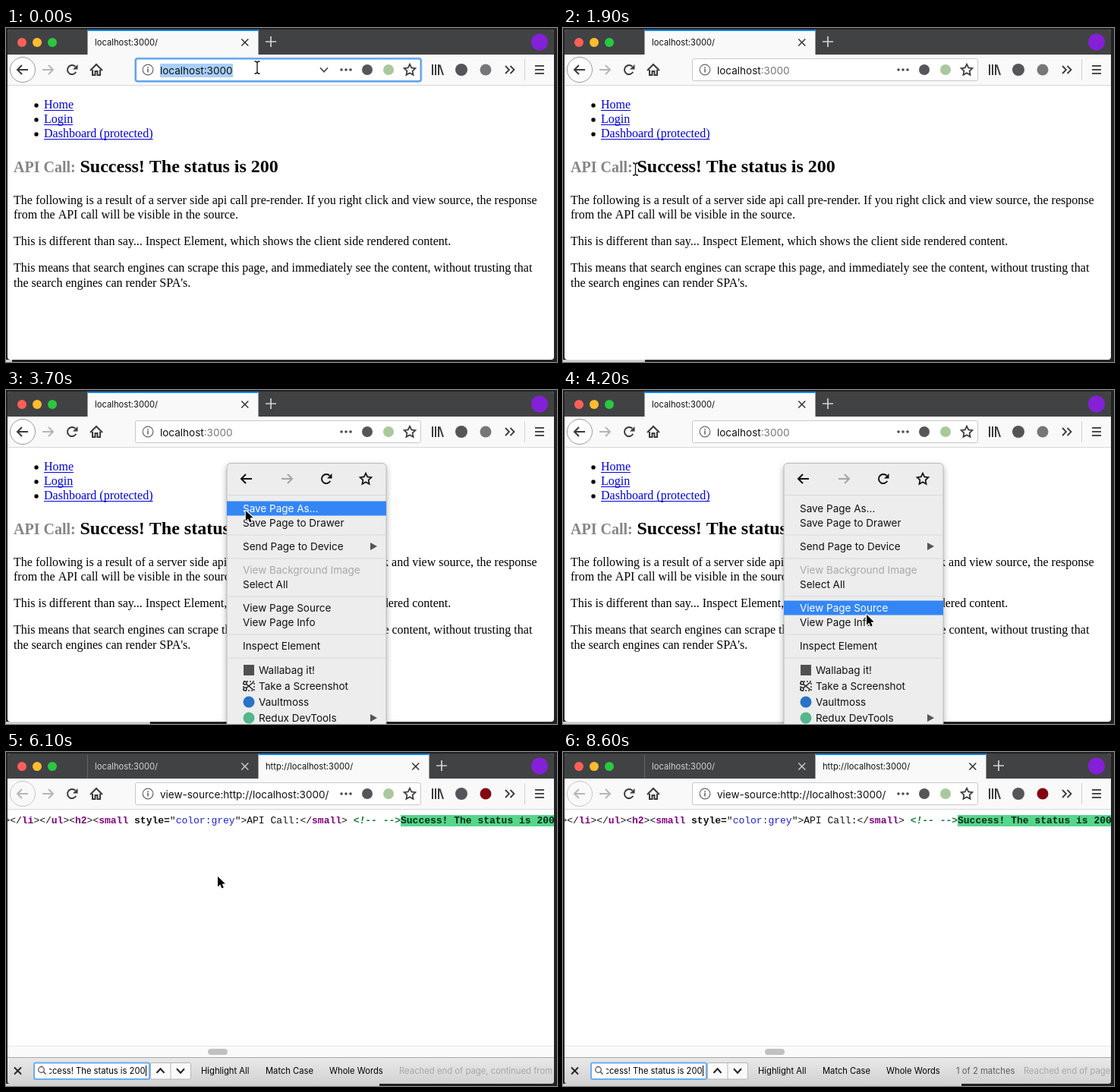
An HTML page with a canvas that plays this animation: 726 px wide and 440 px high, repeating every 8.7 s.

```html
<!DOCTYPE html>
<html lang="en">
<head>
<meta charset="utf-8">
<title>Server-side rendering check</title>
<style>
html, body { margin: 0; width: 100%; height: 100%; overflow: hidden; background: #222; }
canvas { display: block; }
</style>
</head>
<body>
<canvas id="stage" width="726" height="440"></canvas>
<script>
const c = document.getElementById('stage').getContext('2d');
const LOOP = 8700, STEP = 100;
const UI = 'Inter, "Open Sans", sans-serif';
const SERIF = '"Liberation Serif", "Times New Roman", serif';
const MONO = '"Liberation Mono", "Courier New", monospace';
const INK = '#3a3a3c', FAINT = '#b6b6b9', BLUE = '#0a84ff';

// Key times
const BLUR = 600, DRAG = [2000, 2600], RING = [3100, 3400], MENU = [3400, 4600];
const SOURCE = 4800, FIND = 5600, MATCH = 5900, COUNT = 6200, HIDE = 6400;

const mouse = [[0, 331, 52], [900, 331, 52], [1800, 95, 186], [2000, 96, 186], [2600, 361, 186],
  [2750, 361, 186], [3100, 295, 125], [3500, 295, 125], [4200, 400, 296], [4500, 399, 289],
  [4900, 382, 266], [5300, 382, 266], [6000, 279, 164], [8700, 279, 164]];
const bar = [[0, 8], [1800, 108], [3300, 108], [4200, 292], [4900, 417], [6100, 492], [6300, 525], [8700, 525]];

const within = (t, [a, b]) => t >= a && t < b;
const smooth = k => k * k * (3 - 2 * k);

function track(keys, t, ease = k => k) {
  const i = Math.max(1, keys.findIndex(k => k[0] >= t));
  const a = keys[i - 1], b = keys[i];
  const k = ease((t - a[0]) / (b[0] - a[0]));
  return a.slice(1).map((v, j) => v + (b[j + 1] - v) * k);
}

function rect(x, y, w, h, fill) {
  c.fillStyle = fill;
  c.fillRect(x, y, w, h);
}

function box(x, y, w, h, r, fill, stroke, width = 1) {
  c.beginPath();
  c.roundRect(x, y, w, h, r);
  paint(fill, stroke, width);
}

function disc(x, y, r, fill, stroke, width = 1) {
  c.beginPath();
  c.arc(x, y, r, 0, Math.PI * 2);
  paint(fill, stroke, width);
}

function paint(fill, stroke, width) {
  if (fill) { c.fillStyle = fill; c.fill(); }
  if (stroke) { c.strokeStyle = stroke; c.lineWidth = width; c.stroke(); }
}

function line(color, width, ...pts) {
  c.beginPath();
  for (let i = 0; i < pts.length; i += 2) c.lineTo(pts[i], pts[i + 1]);
  paint(null, color, width);
}

function text(str, x, y, font, color = '#000') {
  c.font = font;
  c.fillStyle = color;
  c.fillText(str, x, y);
  return c.measureText(str).width;
}

const ui = (str, x, y, size, color) => text(str, x, y, `${size}px ${UI}`, color);

function clipped(x, y, w, h, draw) {
  c.save();
  c.beginPath();
  c.rect(x, y, w, h);
  c.clip();
  draw();
  c.restore();
}

// Icons
function cross(x, y, r, color, width = 1.5) {
  line(color, width, x - r, y - r, x + r, y + r);
  line(color, width, x + r, y - r, x - r, y + r);
}

function plus(x, y, color) {
  line(color, 1.7, x - 7, y, x + 7, y);
  line(color, 1.7, x, y - 7, x, y + 7);
}

function arrow(x, y, dir, color) {
  line(color, 2, x - 7 * dir, y, x + 7 * dir, y);
  line(color, 2, x + dir, y - 6, x + 7 * dir, y, x + dir, y + 6);
}

function chevron(x, y, dx, dy, color, width = 2) {
  if (dx) line(color, width, x - dx, y - 5, x + dx, y, x - dx, y + 5);
  else line(color, width, x - 5, y - dy, x, y + dy, x + 5, y - dy);
}

function reload(x, y, color) {
  c.beginPath();
  c.arc(x, y, 6, 0.5, 5.5);
  paint(null, color, 2);
  c.beginPath();
  c.moveTo(x + 7.5, y - 7);
  c.lineTo(x + 7.5, y - 0.5);
  c.lineTo(x + 1, y - 0.5);
  paint(color);
}

function star(x, y, color) {
  c.beginPath();
  for (let i = 0; i < 10; i++) {
    const r = i % 2 ? 3.8 : 7.8, a = i * Math.PI / 5 - Math.PI / 2;
    c.lineTo(x + r * Math.cos(a), y + r * Math.sin(a) + 0.5);
  }
  c.closePath();
  paint(null, color, 1.7);
}

function home(x, y) {
  line(INK, 2, x - 8, y + 1, x, y - 7, x + 8, y + 1);
  line(INK, 2, x - 5, y, x - 5, y + 7, x - 1.5, y + 7, x - 1.5, y + 2, x + 1.5, y + 2,
    x + 1.5, y + 7, x + 5, y + 7, x + 5, y);
}

function lens(x, y) {
  disc(x, y - 1, 3.8, null, '#444', 1.2);
  line('#444', 1.4, x + 2.8, y + 1.8, x + 6, y + 5);
}

function scissors(x, y) {
  c.setLineDash([2, 2]);
  c.strokeStyle = '#333';
  c.lineWidth = 1.5;
  c.strokeRect(x - 7, y - 6, 14, 12);
  c.setLineDash([]);
  line('#222', 1.6, x - 4, y + 3, x + 6, y - 5);
  line('#222', 1.6, x - 4, y - 3, x + 6, y + 5);
  disc(x - 5, y - 4, 2, '#eee', '#222', 1.4);
  disc(x - 5, y + 4, 2, '#eee', '#222', 1.4);
}

function tab(x, w, title, active) {
  if (active) {
    rect(x, 2, w, 33, '#f9f9fa');
    rect(x, 2, w, 2, BLUE);
  } else {
    rect(x - 0.5, 4, 1, 31, '#626365');
  }
  const ink = active ? '#111' : '#d4d4d6';
  clipped(x, 2, Math.max(0, w - 32), 33, () => ui(title, x + 9.5, 23, 11.2, ink));
  if (w > 40) cross(x + w - 17.7, 19, 4.5, active ? '#333' : '#c8c8ca');
}

function chrome(t) {
  const source = t >= SOURCE;
  rect(2, 2, 720, 33, '#414244');
  ['#ff5f57', '#ffbd2e', '#28c940'].forEach((col, i) => disc(21 + i * 20, 19, 6, col));
  tab(107.5, 225, 'localhost:3000/', !source);
  const w = source ? Math.min(225, 80 + (t - SOURCE) * 0.89) : 0;
  if (source) tab(332.5, w, 'http://localhost:3000/', true);
  plus(349 + w, 18, '#d4d4d6');
  disc(703, 18.5, 11, '#8420d8');

  rect(2, 35, 720, 41, '#f9f9fa');
  rect(2, 75, 720, 1, '#d8d8da');
  disc(22, 55, 16.5, source ? '#f9f9fa' : '#fff', source ? '#c6c6c8' : '#9a9a9c');
  arrow(22, 55, -1, source ? FAINT : INK);
  arrow(55, 55, 1, FAINT);
  reload(87, 55, INK);
  home(119, 55);

  const focus = t < BLUR;
  if (focus) {
    box(170.5, 40, 376.5, 30.5, 3, '#fff', '#a9cdf5', 3);
    box(171, 40.5, 375.5, 29.5, 2, null, '#4797ea', 1.5);
    rect(203, 47, 96, 18, '#a9cffa');
  } else {
    box(170.5, 40.5, 376, 29, 2, '#fff', '#c9c9cb');
  }
  disc(187, 55, 6.8, null, '#66666a', 1.2);
  rect(186.2, 53.5, 1.6, 5, '#66666a');
  rect(186.2, 51, 1.6, 1.6, '#66666a');
  if (source) {
    ui('view-source:http://localhost:3000/', 203, 60.5, 13.5, '#111');
  } else {
    const host = ui('localhost', 203, 60.5, 13.5, '#111');
    ui(':3000', 203 + host, 60.5, 13.5, focus ? '#111' : '#77777a');
  }
  if (t < 1200) chevron(419, 55, 0, 2.7, '#55555a', 1.8);
  for (let i = -1; i < 2; i++) disc(448 + i * 6, 55, 1.8, '#4a4a4e');
  disc(476, 55, 7, '#55555a');
  disc(504, 55, 7, '#a9c99d');
  star(532, 55, INK);

  for (let i = 0; i < 3; i++) rect(561 + i * 4, 48, 2, 14, INK);
  line(INK, 2, 571.5, 48.5, 576, 62);
  disc(600, 55, 8, '#555559');
  disc(632, 55, 7.5, source ? '#850510' : '#77777b');
  chevron(660.5, 55, 2.5, 0, INK, 1.8);
  chevron(667, 55, 2.5, 0, INK, 1.8);
  rect(683, 41, 1, 28, '#d0d0d2');
  for (let i = -1; i < 2; i++) rect(697, 54 + i * 5, 12, 1.8, INK);
}

function page(t) {
  ['Home', 'Login', 'Dashboard (protected)'].forEach((label, i) => {
    const y = 106 + i * 19;
    disc(40, y - 4, 2.7, '#000');
    const w = text(label, 50, y, `16px ${SERIF}`, '#0000e0');
    rect(50, y + 2, w, 1, '#0000e0');
  });
  const end = 98 + 260.5 * Math.min(1, (t - DRAG[0]) / (DRAG[1] - DRAG[0]));
  if (within(t, [DRAG[0], MENU[0]])) rect(98, 172, end - 98, 24, '#b4d5fe');
  text('API Call:', 10, 190, `bold 20px ${SERIF}`, '#858585');
  text('Success! The status is 200', 97.5, 190, `bold 24px ${SERIF}`);
  [
    [232, 'The following is a result of a server side api call pre-render. If you right click and view source, the response'],
    [251, 'from the API call will be visible in the source.'],
    [286, 'This is different than say... Inspect Element, which shows the client side rendered content.'],
    [321, 'This means that search engines can scrape this page, and immediately see the content, without trusting that'],
    [341, "the search engines can render SPA's."]
  ].forEach(([y, str]) => text(str, 10, y, `16px ${SERIF}`));
}

function menu(y0) {
  c.save();
  c.shadowColor = 'rgba(0,0,0,.35)';
  c.shadowBlur = 9;
  c.shadowOffsetY = 3;
  box(291, 97, 210, 360, 5, '#ededed');
  c.restore();
  box(291, 96.5, 210, 360, 5, null, '#bcbcbc');
  arrow(317, 117, -1, '#111');
  arrow(370, 117, 1, '#a5a5a5');
  reload(422, 117, '#111');
  star(474, 117, '#111');
  [138, 190.5, 221.5, 271.5, 321.5, 352.5].forEach(y => rect(292, y, 208, 1, '#d9d9d9'));
  [
    [156, 'Save Page As...'], [175, 'Save Page to Drawer'], [206, 'Send Page to Device', 'sub'],
    [237, 'View Background Image', 'off'], [256, 'Select All'], [287, 'View Page Source'],
    [306, 'View Page Info'], [337, 'Inspect Element'], [369, 'Wallabag it!', 'icon'],
    [390, 'Take a Screenshot', 'icon'], [411, 'Vaultmoss', 'icon'], [432, 'Redux DevTools', 'icon sub']
  ].forEach(([y, label, kind = '']) => {
    const hot = kind !== 'off' && Math.abs(y - y0) <= 9.5;
    if (hot) rect(291, y - 9.5, 210, 19, '#3486f6');
    const ink = hot ? '#fff' : kind === 'off' ? '#a9a9a9' : '#111';
    ui(label, kind.includes('icon') ? 333 : 312, y + 5, 13.5, ink);
    if (kind.includes('sub')) {
      c.beginPath();
      c.moveTo(480, y - 5);
      c.lineTo(489, y);
      c.lineTo(480, y + 5);
      paint(hot ? '#fff' : '#555');
    }
  });
  rect(313, 362, 14, 14, '#505050');
  scissors(320, 390);
  disc(320, 411, 7.5, '#2873c8');
  disc(320, 432, 7.5, '#55b58c');
}

// Markup colouring: one pattern per token kind
const tokens = /<!--.*?-->|<!DOCTYPE.*?>|<\/?[a-z0-9]+|[a-zA-Z]+(?==")|"[^"]*"?|\/?>|[^<>"]+/g;

function markup(src, x, y) {
  const put = (str, color = '#111', style = '') => {
    x += text(str, x, y, `${style} 13px ${MONO}`, color);
  };
  let inTag = false;
  for (const tok of src.match(tokens)) {
    if (tok.startsWith('<!--')) put(tok, '#117a35', 'italic bold');
    else if (tok.startsWith('<!')) put(tok, '#4a7db5', 'italic bold');
    else if (tok[0] === '<') {
      const [, open, name] = tok.match(/(<\/?)(.*)/);
      put(open);
      put(name, '#800080', 'bold');
      inTag = true;
    } else if (tok.endsWith('>')) {
      put(tok);
      inTag = false;
    } else if (tok[0] === '"') {
      put('"');
      put(tok.slice(1).replace('"', ''), '#2020d8');
      if (tok.length > 1 && tok.endsWith('"')) put('"');
    } else put(tok, '#111', inTag && tok !== '=' ? 'bold' : '');
  }
}

function source(t) {
  const found = t >= MATCH;
  clipped(2, 77, 720, 359, () => {
    if (found) {
      rect(520, 83, 202, 15, '#55d68a');
      markup('></li></ul><h2><small style="color:grey">API Call:</small> <!-- -->', -2.6, 94);
      text('Success! The status is 200', 520, 94, `bold 13px ${MONO}`, '#0c2a18');
    } else {
      text('1', 34, 94, `13px ${MONO}`, '#c4c4c4');
      markup('<!DOCTYPE html><html><head><meta charSet="utf-8"/><meta name="viewport" content="width=device', 49, 94);
    }
  });
  const y = t >= FIND ? 388 : 423;
  rect(2, y, 720, 14, '#fafafa');
  rect(2, y - 1, 720, 1, '#e8e8e8');
  box(found ? 266 : 3, y + 3, 26, 8, 4, '#c1c1c1');
  if (t >= FIND) findBar(t, found);
}

function findBar(t, found) {
  const g = c.createLinearGradient(0, 402, 0, 437);
  g.addColorStop(0, '#e9e9e9');
  g.addColorStop(1, '#d2d2d2');
  rect(2, 402, 720, 35, g);
  rect(2, 402, 720, 1, '#a8a8a8');
  cross(15.5, 420, 4.5, '#222', 1.8);
  box(190.5, 409.5, 53, 21.5, 2, '#fafafa', '#b5b5b5');
  rect(216.5, 410, 1, 21, '#b5b5b5');
  chevron(203.5, 420, 0, -2.7, '#222');
  chevron(230, 420, 0, 2.7, '#222');
  box(37, 409.5, 152, 21.5, 2, '#fff', '#6aaef2', 2);
  lens(46.5, 419.5);
  clipped(57, 411, 129, 19, () => {
    if (!found) return ui('Find in page', 57, 424, 11.2, '#999');
    c.textAlign = 'right';
    ui('Success! The status is 200', 183.5, 424, 11.2, '#000');
    c.textAlign = 'left';
  });
  const blinkOff = within(t, [6400, 7000]) || within(t, [7500, 8100]);
  if (!blinkOff) rect(found ? 184 : 57, 413, 1, 14, '#000');
  ui('Highlight All', 257, 424, 11.2, '#000');
  ui('Match Case', 342, 424, 11.2, '#000');
  ui('Whole Words', 426, 424, 11.2, '#000');
  if (!found) return;
  const note = 'Reached end of page, continued from top';
  if (t < COUNT) {
    clipped(2, 403, 720, 34, () => ui(note, 518, 424, 11.3, '#a6a6a6'));
  } else {
    ui('1 of 2 matches', 518, 424, 11.3, '#5c5c5c');
    ui(note.slice(0, 20), 607, 424, 11.3, '#a6a6a6');
  }
}

function pointer(x, y) {
  c.beginPath();
  [[0, 0], [0, 13.5], [3.2, 10.6], [5.4, 15.6], [7.8, 14.5], [5.7, 9.7], [9.8, 9.4]]
    .forEach(([dx, dy]) => c.lineTo(x + dx, y + dy));
  c.closePath();
  c.lineJoin = 'round';
  paint(null, '#fff', 2.2);
  paint('#000');
  c.lineJoin = 'miter';
}

function beam(x, y) {
  for (const [color, w] of [['#fff', 3], ['#111', 1.3]]) {
    line(color, w, x, y - 7, x, y + 7);
    line(color, w, x - 3.5, y - 8, x - 1.5, y - 8, x, y - 6.5, x + 1.5, y - 8, x + 3.5, y - 8);
    line(color, w, x - 3.5, y + 8, x - 1.5, y + 8, x, y + 6.5, x + 1.5, y + 8, x + 3.5, y + 8);
  }
}

function draw(t) {
  const [mx, my] = track(mouse, t, smooth);
  rect(0, 0, 726, 440, '#222');
  c.save();
  c.beginPath();
  c.roundRect(2, 2, 720, 435, 4);
  c.clip();
  rect(2, 2, 720, 435, '#fff');
  chrome(t);
  if (t < SOURCE) page(t);
  else source(t);
  c.restore();
  rect(0, 437, track(bar, t)[0], 3, '#d0d0d0');
  if (within(t, MENU)) menu(my);
  if (within(t, RING)) disc(295, 125, 20, null, '#000', 3);
  if (t >= HIDE) return;
  const overText = my < 70 || (t > 1600 && t < 2800);
  (overText ? beam : pointer)(mx, my);
}

function tick() {
  const t = performance.now() % LOOP;
  draw(Math.floor(t / STEP) * STEP);
  requestAnimationFrame(tick);
}
tick();
</script>
</body>
</html>
```
